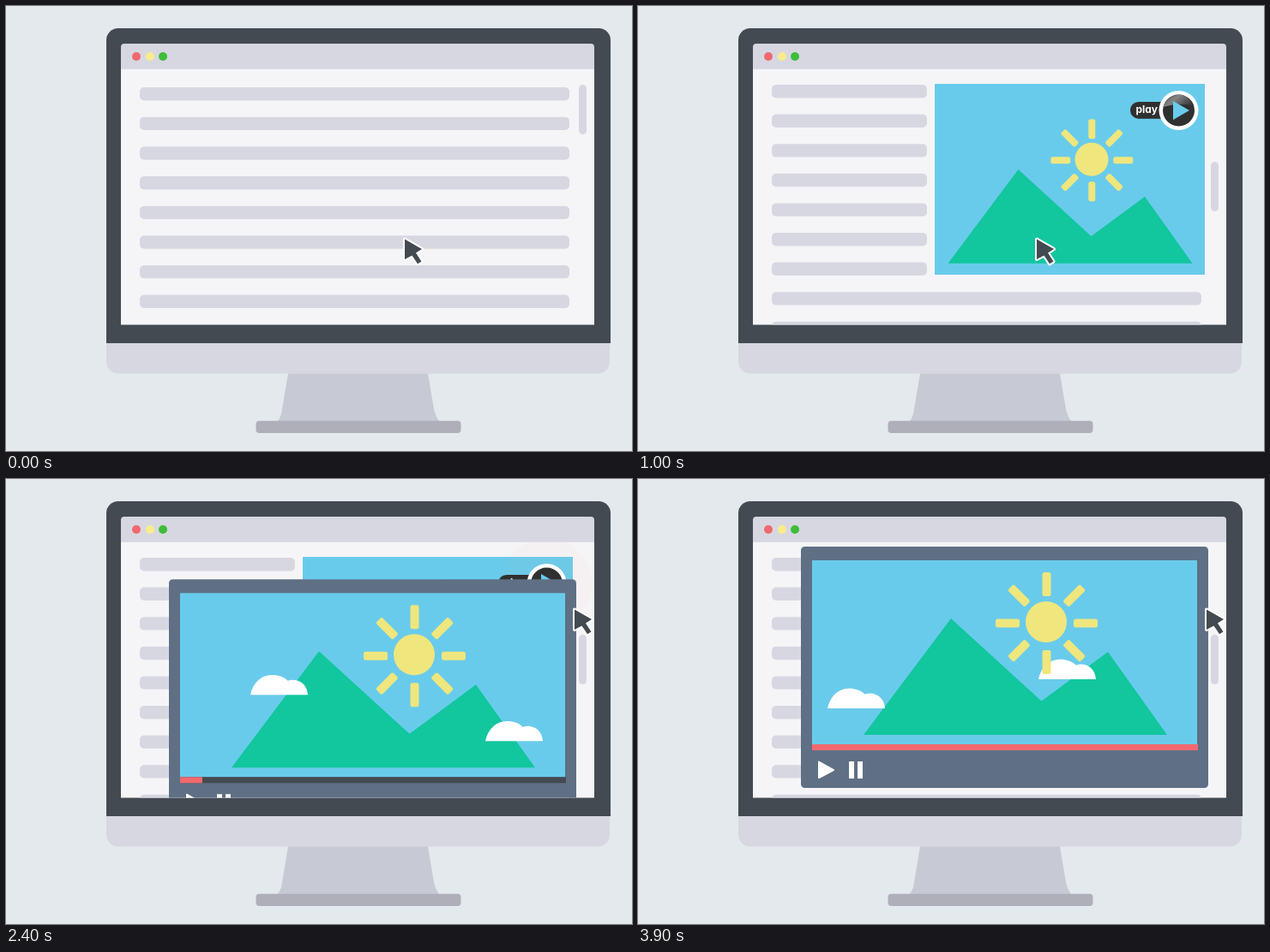
Write an HTML page that moves like this. It is 730 px wide and 520 px high and loops after 5900 ms.

```html
<!DOCTYPE html>
<html lang="en">
<head>
<meta charset="utf-8">
<title>Video popup</title>
<style>
  html, body { margin: 0; width: 100%; height: 100%; overflow: hidden; background: #e3e9ec; }
  svg { display: block; width: 730px; height: 520px; }
  .dark { fill: #434a51; }
  .pale { fill: #d7d7e1; }
  .sky { fill: #69cbeb; }
  .hill { fill: #12c69e; }
  .sun { fill: #efe67d; }
  .red { fill: #f0696e; }
  .white { fill: #fff; }
  .ink { fill: #303030; }
  .label { font: 700 12px Inter, "Open Sans", sans-serif; font-feature-settings: "cv11"; fill: #fff; }
</style>
</head>
<body>
<svg viewBox="0 0 730 520">
  <defs>
    <clipPath id="view"><rect x="134" y="74" width="552" height="298.4"/></clipPath>
    <clipPath id="film"><rect x="203" y="95" width="449" height="215"/></clipPath>
    <linearGradient id="shine" x1="0" y1="0" x2="1" y2=".5">
      <stop offset="0" stop-color="#4a4a4a"/>
      <stop offset=".45" stop-color="#858585"/>
      <stop offset="1" stop-color="#3c3c3c"/>
    </linearGradient>
    <path id="cloud" class="white" d="M0 23.5C3 9 13 .3 25 .3C33 .3 40 3 43.500 7C55 3.500 66 10 67 23.500Z"/>
  </defs>

  <!-- computer -->
  <path class="dark" d="M117 394V40a14 14 0 0 1 14-14H691a14 14 0 0 1 14 14V394Z"/>
  <path class="pale" d="M117 394H704V415.500a14 14 0 0 1-14 14H131a14 14 0 0 1-14-14Z"/>
  <path fill="#c7c9d5" d="M329 429.500H492L499 471Q501 480 505 485H317Q321 480 322 471Z"/>
  <rect x="291.500" y="484.700" width="239" height="14.300" rx="4" fill="#afafba"/>

  <!-- window -->
  <path fill="#f5f5f8" d="M134 73H686V372.400H134Z"/>
  <path class="pale" d="M134 73.700V48a4 4 0 0 1 4-4H682a4 4 0 0 1 4 4V73.700Z"/>
  <circle class="red" cx="152" cy="59" r="5"/>
  <circle fill="#faec8b" cx="168" cy="59" r="5"/>
  <circle fill="#3ebd3a" cx="183" cy="59" r="5"/>
  <rect id="thumb" class="pale" x="668" y="92" width="9" height="58" rx="4.500"/>

  <g clip-path="url(#view)">
    <g id="intro" class="pale"></g>
    <g id="page">
      <g id="article" class="pale"></g>
      <rect class="sky" x="346" y="91" width="315" height="223"/>
      <circle class="sun" cx="529" cy="179.200" r="19.500"/>
      <g id="smallSun" class="sun"></g>
      <path class="hill" d="M361.500 300.700L443.500 191L528.500 269L591 222.700L646.500 300.700Z"/>
      <circle id="ring" cx="630.500" cy="122" fill="#ee8270"/>
      <rect class="ink" x="574" y="112" width="50" height="19.700" rx="9.800"/>
      <text class="label" x="593.200" y="125.200" text-anchor="middle">play</text>
      <circle class="white" cx="630.500" cy="122" r="23"/>
      <circle class="ink" cx="630.500" cy="122" r="18.500"/>
      <path id="gloss" fill="url(#shine)" d="M612.500 118A18.500 18.500 0 0 1 648 116Q628 113 612.500 118Z"/>
      <path class="sky" d="M624 111L643 122L624 133Z"/>
    </g>

    <g id="panel">
      <rect x="190" y="79" width="475" height="282" rx="4.500" fill="#5f7085"/>
      <rect class="sky" x="203" y="95" width="449" height="215"/>
      <g clip-path="url(#film)">
        <circle class="sun" cx="476" cy="167" r="24"/>
        <path class="hill" d="M263 299L365 163L470.500 259.500L548 202L617 299Z"/>
        <use id="cloudA" href="#cloud"/>
        <use id="cloudB" href="#cloud"/>
        <use id="cloudC" href="#cloud"/>
        <g id="bigSun" class="sun"></g>
      </g>
      <rect class="dark" x="203" y="310" width="450" height="7"/>
      <rect id="fill" class="red" x="203" y="310" height="7"/>
      <path class="white" stroke="#fff" stroke-width="2" stroke-linejoin="round" d="M211 330.500L228 340L211 349Z"/>
      <path class="white" d="M246 330h6v20h-6ZM256 330h6v20h-6Z"/>
    </g>
  </g>

  <path id="cursor" class="dark" stroke="#fff" stroke-width="4" stroke-linejoin="round" paint-order="stroke"
        d="M1 1.500L21 13L14 17.500L20.500 27.500L16 30.300L9.500 20.500L1 25Z"/>
</svg>
<script>
const LOOP = 5900, STEP = 100, LAST = 39;
const PITCH = 34.6, PAGE = 282;
const NS = 'http://www.w3.org/2000/svg';
const $ = id => document.getElementById(id);

function set(el, attrs) {
  for (const key in attrs) el.setAttribute(key, attrs[key]);
}

function addRect(parent, attrs) {
  const rect = document.createElementNS(NS, 'rect');
  set(rect, attrs);
  parent.appendChild(rect);
}

function addLine(parent, y, width) {
  addRect(parent, { x: 156, y, width, height: 15.4, rx: 5 });
}

function addRays(parent, cx, cy, inner, width, length) {
  for (let i = 0; i < 8; i++) {
    addRect(parent, {
      x: cx - width / 2, y: cy - inner - length, width, height: length, rx: 2.5,
      transform: `rotate(${i * 45} ${cx} ${cy})`
    });
  }
}

for (let i = 0; i < 8; i++) addLine($('intro'), 95 + i * 34.66, 501);
for (let i = 0; i < 9; i++) addLine($('article'), 92 + i * PITCH, i < 7 ? 181 : 501);
addRays($('smallSun'), 529.3, 180.2, 25, 8, 23);
addRays($('bigSun'), 476.5, 168.5, 31.5, 10, 28);

// Progress from step a to step b, limited to 0..1.
const span = (n, a, b) => Math.min(1, Math.max(0, (n - a) / (b - a)));
const mix = (a, b, u) => a + (b - a) * u;
const bend = (a, b, c, u) => mix(mix(a, b, u), mix(b, c, u), u);
const move = (id, x, y) => set($(id), { transform: `translate(${x} ${y})` });

function draw(n) {
  // Scroll runs past its stop, then settles.
  const run = span(n, 0, 6);
  const scroll = (PAGE + 8) * run - 8 * span(n, 6, 9);
  move('intro', 0, -scroll);
  move('page', 0, PAGE - scroll);
  set($('thumb'), { y: 92 + 90 * run });

  const go = span(n, 10, 15), leave = span(n, 21, 24);
  move('cursor',
    bend(464, 600, 636, go) + 26 * leave,
    bend(271, 325, 133, go) + 18 * leave);

  // Two pulses around the pressed button.
  const beat = n >= 15 && n < 25 ? n % 5 : 0;
  set($('ring'), { r: 23 + 7.5 * beat, opacity: beat ? Math.max(0, 0.95 - 0.23 * beat) : 0 });
  set($('gloss'), { opacity: n < 16 ? 1 : 0 });

  const top = mix(395, 71, span(n, 18, 25)) + 8 * span(n, 25, 28);
  move('panel', 0, top - 79);
  set($('panel'), { visibility: n > 18 ? 'visible' : 'hidden' });

  const time = span(n, 27, LAST);
  const drift = time ** 1.71;
  move('cloudA', 285 - 530 * drift, 190.5);
  move('cloudB', 559 - 338 * drift, 244.5);
  move('cloudC', 805 - 338 * drift, 210.5);
  set($('bigSun'), { transform: `rotate(${90 * drift} 476.5 168.5)` });
  set($('fill'), { width: mix(26, 450, time ** 1.575) });
}

const start = performance.now();
function tick() {
  const t = (performance.now() - start) % LOOP;
  draw(Math.min(LAST, Math.floor(t / STEP)));
  requestAnimationFrame(tick);
}
tick();
</script>
</body>
</html>
```
